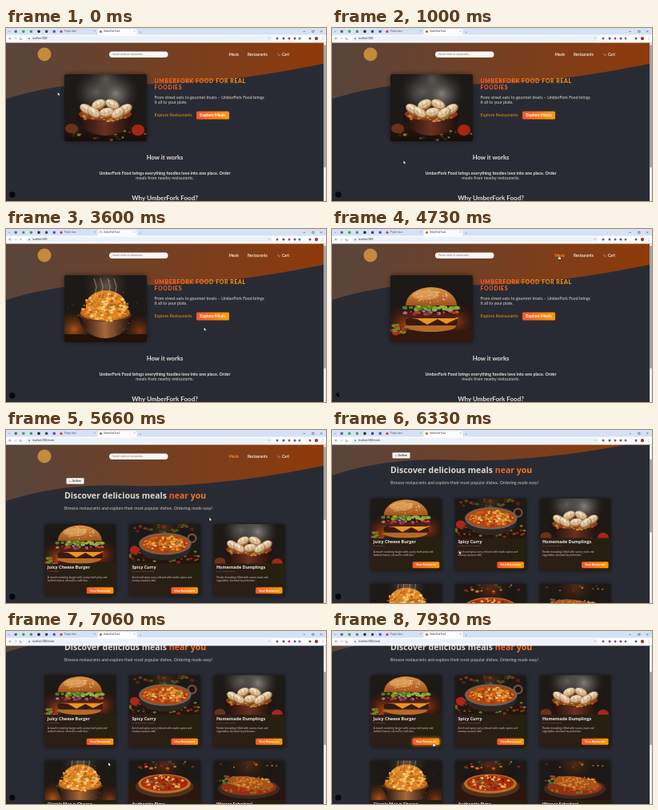
Write an HTML page with a canvas that moves like this. It is 400 px wide and 217 px high and loops after 8 s.

```html
<!DOCTYPE html>
<html lang="en">
<head>
<meta charset="utf-8">
<title>UmberFork Food</title>
<style>
html, body { margin: 0; width: 100%; height: 100%; overflow: hidden; background: #292b34; }
canvas { display: block; width: 100vw; height: 100vh; }
</style>
</head>
<body>
<canvas></canvas>
<script>
const LOOP = 8000, TOP = 18.4, BRAND = 'UmberFork Food';
const canvas = document.querySelector('canvas'), g = canvas.getContext('2d');
const SANS = 'Lato, sans-serif', HEAD = '"Open Sans", sans-serif', UI = 'Roboto, sans-serif';

// ---------- drawing helpers ----------
function text(str, x, y, size, color = '#ddd6cb', { weight = 400, font = SANS, align = 'left', gap = 0 } = {}) {
  g.font = `${weight} ${size}px ${font}`;
  g.letterSpacing = gap + 'px';
  g.textAlign = align;
  g.textBaseline = 'middle';
  g.fillStyle = color;
  g.fillText(str, x, y);
  return g.measureText(str).width;
}
function box(x, y, w, h, color, r = 0) {
  g.beginPath();
  g.roundRect(x, y, w, h, r);
  g.fillStyle = color;
  g.fill();
}
function oval(x, y, rx, ry, color, from = 0, to = Math.PI * 2, turn = 0) {
  g.beginPath();
  g.ellipse(x, y, rx, ry, turn, from, to);
  g.fillStyle = color;
  g.fill();
}
function shape(points, color) {
  g.beginPath();
  points.forEach(([x, y]) => g.lineTo(x, y));
  g.closePath();
  g.fillStyle = color;
  g.fill();
}
function line(points, color, width = 0.5) {
  g.beginPath();
  points.forEach(([x, y], i) => i ? g.lineTo(x, y) : g.moveTo(x, y));
  g.strokeStyle = color;
  g.lineWidth = width;
  g.stroke();
}
function fade(x0, y0, x1, y1, ...colors) {
  const grad = g.createLinearGradient(x0, y0, x1, y1);
  colors.forEach((c, i) => grad.addColorStop(i / (colors.length - 1), c));
  return grad;
}
function glow(x, y, r, color) {
  const grad = g.createRadialGradient(x, y, 0, x, y, r);
  grad.addColorStop(0, color);
  grad.addColorStop(1, 'rgba(0,0,0,0)');
  box(x - r, y - r, 2 * r, 2 * r, grad);
}
// Seeded scatter of small ovals inside a larger oval
function scatter(seed, n, x, y, rx, ry, size, colors) {
  const rnd = () => (seed = (seed * 16807) % 2147483647) / 2147483647;
  rnd();
  for (let i = 0; i < n; i++) {
    const a = rnd() * 6.283, d = Math.sqrt(rnd()), s = size * (0.6 + rnd() * 0.6);
    oval(x + Math.cos(a) * d * rx, y + Math.sin(a) * d * ry, s, s * 0.7, colors[i % colors.length]);
  }
}
const button = (label, x, y, w, h, size) => {
  box(x, y, w, h, fade(x, 0, x + w, 0, '#f9572a', '#ff9b05'), 1.5);
  text(label, x + w / 2, y + h / 2 + 0.2, size, '#fff', { weight: 700, align: 'center' });
};

// ---------- food pictures, drawn on a 103 x 84 field ----------
function bowl(y, rx, depth, side, rim) {
  oval(51, y, rx, depth, fade(51 - rx, 0, 51 + rx, 0, '#180e0b', side, '#1a0e0a'), 0, Math.PI);
  oval(51, y, rx, rx * 0.24, rim);
}
const foods = {
  dumplings() {
    glow(40, 22, 34, 'rgba(165,162,156,.7)');
    glow(64, 24, 34, 'rgba(190,186,178,.75)');
    glow(52, 6, 30, 'rgba(120,116,110,.6)');
    box(0, 66, 103, 18, fade(0, 62, 0, 84, '#2b1a11', '#150d0a'));
    scatter(9, 30, 51, 75, 50, 8, 2.2, ['#59301b', '#6d7a31', '#8e2417', '#33201a']);
    bowl(50, 35, 27, '#6b3020', '#2a1510');
    oval(51, 50, 33, 8, '#8c3a16');
    scatter(5, 50, 51, 53, 31, 6, 1.8, ['#c4541c', '#7f9a36', '#e28b33', '#a83a16']);
    for (const [x, y, turn] of [[28, 44, 0.5], [43, 38, -0.4], [60, 38, 0.4], [76, 44, -0.5], [37, 48, 0.6], [53, 48, -0.2], [67, 49, -0.6]]) {
      oval(x, y, 9.5, 6, '#a3774b', 0, 7, turn);
      oval(x - 0.5, y - 1, 8.5, 4.8, '#d8bd95', 0, 7, turn);
      oval(x - 1, y - 2.5, 6.5, 2, '#efe0c4', 0, 7, turn);
      line([[x - 4, y - 3], [x - 2, y + 3]], '#b98a5b', 0.7);
      line([[x + 2, y - 4], [x + 3, y + 3]], '#b98a5b', 0.7);
    }
    oval(92, 70, 8, 7, '#a62616');
    oval(9, 68, 8, 6, '#6b3219');
  },
  mac() {
    glow(52, 14, 36, 'rgba(150,128,104,.6)');
    glow(12, 68, 30, 'rgba(230,105,20,.75)');
    glow(94, 70, 28, 'rgba(205,78,15,.6)');
    box(0, 74, 103, 10, '#21110a');
    bowl(50, 33, 29, '#a8683a', '#5b341d');
    oval(51, 47, 31, 10, '#c96b15');
    oval(52, 38, 25, 19, '#dd8524');
    scatter(17, 150, 51, 40, 29, 18, 2.2, ['#eca03a', '#f2b955', '#d97c1d', '#c2601a', '#f6cd7d']);
    scatter(8, 18, 51, 36, 23, 13, 1.2, ['#68902d', '#bd3516']);
    for (const x of [38, 46, 55, 63]) line([[x, 28], [x + 2, 14], [x - 1, 4]], 'rgba(240,215,175,.4)', 1.2);
    scatter(33, 40, 51, 42, 49, 38, 0.6, ['#ff9b32', '#a8440d']);
  },
  burger() {
    glow(18, 62, 32, 'rgba(220,80,16,.65)');
    glow(84, 58, 30, 'rgba(190,60,14,.65)');
    box(0, 69, 103, 15, '#32180e');
    oval(51, 64, 31, 7, '#b66a28');
    box(19, 54, 65, 9, '#3a1a0e', 4);
    shape([[18, 53], [86, 53], [70, 61], [59, 55], [46, 62], [34, 55]], '#e8961e');
    box(20, 48, 63, 6, '#4f1f14', 3);
    scatter(19, 30, 51, 47, 33, 2.5, 2.4, ['#7c3152', '#b0688c', '#c53a1c']);
    scatter(4, 60, 51, 41, 34, 3, 2.8, ['#7d9e2d', '#567d22', '#98b23f']);
    oval(51, 38, 32, 23, fade(0, 14, 0, 40, '#dd9748', '#9d4c17'), Math.PI, Math.PI * 2);
    oval(44, 25, 17, 6, 'rgba(255,214,140,.35)');
    scatter(11, 45, 51, 26, 23, 9, 0.8, ['#f6d9a0']);
    scatter(7, 18, 10, 68, 12, 6, 3, ['#b62a16', '#6b8728']);
  },
  curry() {
    glow(51, 20, 36, 'rgba(110,62,30,.55)');
    box(0, 56, 103, 28, '#24150e');
    scatter(6, 50, 51, 60, 52, 14, 2.4, ['#8a2515', '#5b7628', '#7c431b', '#3a2216']);
    scatter(41, 24, 51, 20, 50, 6, 2.6, ['#5c2214', '#3d5a22', '#6e3b18']);
    oval(91, 34, 7, 7, '#6c5647');
    oval(91, 34, 4.5, 4.5, '#24150e');
    oval(52, 48, 37, 18, '#2d2723');
    oval(52, 42, 38, 16, '#6f6257');
    oval(52, 42, 35, 13.5, '#b2460f');
    scatter(12, 95, 52, 42, 32, 11, 2.8, ['#e4781c', '#a83510', '#f0a13b', '#d25b16']);
    scatter(21, 22, 52, 40, 28, 9, 1.8, ['#5d862c', '#ead0a0']);
    oval(8, 51, 7, 6, '#a82716');
  },
  pizza() {
    glow(51, 20, 40, 'rgba(125,54,21,.6)');
    box(0, 45, 103, 39, '#2b170f');
    oval(51, 51, 42, 16, '#54301a');
    oval(51, 47, 38, 14, '#bd7228');
    oval(51, 46, 34, 11.5, '#a82b0e');
    scatter(14, 70, 51, 46, 31, 10, 2.4, ['#e7a544', '#c93f16', '#e5bd70', '#a12610']);
    scatter(3, 22, 51, 45, 28, 9, 2, ['#50752a', '#75200f']);
    scatter(27, 18, 51, 20, 46, 7, 2.4, ['#8a2817', '#34491f', '#d06a1e']);
  },
  schnitzel() {
    glow(51, 18, 40, 'rgba(130,62,22,.5)');
    box(0, 58, 103, 26, '#25150e');
    oval(51, 54, 45, 15, '#3d2a24');
    oval(51, 52, 40, 12, '#93310f');
    scatter(24, 30, 24, 42, 16, 7, 2.6, ['#4e6d24', '#6d8b34', '#b4301a']);
    oval(54, 46, 33, 9, '#a9541a', 0, 7, 0.15);
    scatter(29, 85, 54, 45, 30, 8, 1.8, ['#d07d28', '#a54f17', '#dd963c']);
    scatter(13, 26, 52, 57, 34, 4, 2, ['#bd2d15', '#688329', '#d1581b']);
    scatter(31, 10, 51, 19, 46, 5, 1.6, ['#e38128', '#8a3a17']);
  }
};
// Cover-fit a picture into a rectangle
function picture(kind, x, y, w, h, r) {
  const s = Math.max(w / 103, h / 84);
  g.save();
  g.beginPath();
  g.roundRect(x, y, w, h, r);
  g.clip();
  box(x, y, w, h, '#1d1917');
  g.translate(x + (w - 103 * s) / 2, y + (h - 84 * s) / 2);
  g.scale(s, s);
  foods[kind]();
  g.restore();
}

// ---------- motion ----------
const clamp = v => Math.max(0, Math.min(1, v));
const ease = v => v * v * (3 - 2 * v);
const span = (t, a, b) => ease(clamp((t - a) / (b - a)));
function along(t, keys) {
  let i = 0;
  while (i < keys.length - 2 && t >= keys[i + 1][0]) i++;
  const [a, b] = [keys[i], keys[i + 1]], k = span(t, a[0], b[0]);
  return a.slice(1).map((v, j) => v + (b[j + 1] - v) * k);
}
const MOUSE = [
  [60, 64.7, 80.7], [860, 89.5, 166.5], [1800, 89.5, 166.5], [2600, 119.5, 15],
  [2800, 119.5, 15], [3530, 247.6, 123.7], [3600, 247.6, 123.7], [4330, 284, 34],
  [5200, 284, 34], [5660, 254.3, 110], [6060, 254.3, 110], [6460, 128, 165.5],
  [7000, 128, 165.5], [7800, 127.3, 140.5]
];
const SCROLL = [[6130, 0], [6525, 62.5]];

// ---------- page ----------
function header(onMeals, hover) {
  g.beginPath();
  g.moveTo(400, 0);
  g.lineTo(0, 0);
  g.lineTo(0, 89);
  g.bezierCurveTo(60, 70, 105, 68, 160, 70);
  g.bezierCurveTo(235, 72, 320, 61, 400, 44);
  g.fillStyle = fade(0, 0, 400, 0, '#59453c', '#8f3a09');
  g.fill();
  oval(48, 33, 8.5, 8.5, '#c48b3c');
  box(129, 29.5, 73.5, 7.5, '#fbf7f4', 3.7);
  text('Search meals or restaurants...', 133, 33.4, 3.1, '#77706d');
  const bold = { weight: 700 };
  text('Meals', 278.5, 33.4, 4.7, onMeals || hover ? '#ff8a1f' : '#eee5dc', bold);
  text('Restaurants', 302, 33.4, 4.7, '#eee5dc', bold);
  line([[339, 32.3], [340, 32.3], [340.8, 34.4], [342.2, 34.4], [342.6, 32.8]], '#b9c3cf', 0.5);
  text('Cart', 345, 33.6, 4.7, '#eee5dc', bold);
}
function slide(kind, show) {
  if (show <= 0) return;
  g.save();
  g.beginPath();
  g.roundRect(73, 58, 103, 84, 3);
  g.clip();
  g.globalAlpha = show;
  g.translate(124.5, 100);
  g.rotate((show - 1) * 0.087);
  g.scale(1.1 - show * 0.1, 1.1 - show * 0.1);
  picture(kind, -51.5, -42, 103, 84, 0);
  g.restore();
}
function home(t) {
  header(false, t > 4300);
  g.save();
  g.shadowColor = 'rgba(0,0,0,.5)';
  g.shadowBlur = 6;
  box(73, 58, 103, 84, '#1d1917', 3);
  g.restore();
  if (t < 3900) {
    const k = span(t, 3000, 3500);
    slide('dumplings', 1 - k);
    slide('mac', k);
  } else slide('burger', 1);

  const title = { weight: 800, gap: 0.65 }, hot = fade(186, 0, 300, 0, '#f9572a', '#ff9b05');
  text(BRAND.toUpperCase() + ' FOR REAL', 185.5, 67, 6.9, hot, title);
  text('FOODIES', 185.5, 75.2, 6.9, hot, title);
  text(`From street eats to gourmet treats – ${BRAND} brings`, 185.5, 87.2, 5.2);
  text('it all to your plate.', 185.5, 93.6, 5.2);
  text('Explore Restaurants', 185.5, 109.8, 5.4, '#f08c18');
  button('Explore Meals', 238, 104.6, 41, 10, 5.2);

  const mid = { align: 'center' }, strong = { align: 'center', weight: 700 };
  text('How it works', 198.5, 163, 7.7, '#e6e0d7', strong);
  text(`${BRAND} brings everything foodies love into one place. Order`, 198.5, 182, 5.35, '#e9e4dc', strong);
  text('meals from nearby restaurants.', 198.5, 188.2, 5.35, '#ddd6cb', mid);
  text(`Why ${BRAND}?`, 198.5, 214, 8, '#e6e0d7', strong);
}
const MEALS = [
  ['burger', 'Juicy Cheese Burger', 'by Tom Ember', 'A mouth-watering burger with a juicy beef patty and', 'melted cheese, served in a soft bun.'],
  ['curry', 'Spicy Curry', 'by Saffron Corner Company', 'A rich and spicy curry, infused with exotic spices and', 'creamy coconut milk.'],
  ['dumplings', 'Homemade Dumplings', 'by Ah Lo Steam Kitchen', 'Tender dumplings filled with savory meat and', 'vegetables, steamed to perfection.'],
  ['mac', 'Classic Mac n Cheese'],
  ['pizza', 'Authentic Pizza'],
  ['schnitzel', 'Wiener Schnitzel']
];
function card([kind, title, by, first, second], i, hover) {
  const x = 48.3 + (i % 3) * 105.6, y = 118 + Math.floor(i / 3) * 107;
  g.save();
  g.shadowColor = 'rgba(0,0,0,.55)';
  g.shadowBlur = 5;
  box(x, y, 89, 90.5, fade(x, 0, x + 89, 0, '#2c1e19', '#25200f'), 1.5);
  g.restore();
  picture(kind, x, y, 89, 49.5, [1.5, 1.5, 0, 0]);
  text(title, x + 3.5, y + 55, 5.4, '#eee7df', { weight: 700, font: HEAD });
  if (!by) return;
  text(by, x + 3.5, y + 59.7, 2.3, '#a4774e');
  text(first, x + 3.5, y + 66.7, 3.25, '#cbc3ba');
  text(second, x + 3.5, y + 70.7, 3.25, '#cbc3ba');
  g.save();
  if (hover) {
    g.shadowColor = '#f98a1c';
    g.shadowBlur = 4;
  }
  button('View Restaurant', x + 52.5, y + 79.3, 33.5, 8, 3.5);
  g.restore();
}
function meals(t) {
  header(true);
  box(75.5, 60.3, 22, 7.4, '#f6f4f1', 1);
  text('← Go Back', 86.5, 64.1, 3, '#34302e', { align: 'center', weight: 700 });
  const big = { weight: 700, font: HEAD };
  const w = text('Discover delicious meals ', 73, 83.4, 10.5, '#ddd6cb', big);
  text('near you', 73 + w, 83.4, 10.5, fade(205, 0, 251, 0, '#f9572a', '#f5801a'), big);
  text('Browse restaurants and explore their most popular dishes. Ordering made easy!', 73, 98.8, 5.33, '#c9c3ba');
  MEALS.forEach((m, i) => card(m, i, i === 0 && t > 7650));
}

// ---------- browser frame ----------
function ring(x, y, r, t, color) {
  g.beginPath();
  g.arc(x, y, r, t / 130, t / 130 + 4.4);
  g.strokeStyle = color;
  g.lineWidth = 0.6;
  g.stroke();
}
function chrome(t, onMeals) {
  const focus = t > 2600 && t < 3050, loading = t > 3050 && t < 3900;
  box(0, 0, 400, 9, '#d5e2f6');
  box(0, 8.6, 400, TOP - 8.6, '#fbfcfe');
  line([[3, 3.8], [4, 4.8], [5, 3.8]], '#424954');
  ['#61666c', '#39a852', '#4b9659', '#20242c', '#3f4650', '#5a4bd0']
    .forEach((c, i) => box(10.6 + i * 9.6, 2.7, 3.2, 3.2, c, 0.8));
  oval(69, 4.4, 1.6, 1.6, '#cf3f45');
  text('Project docs', 73, 4.5, 2.7, '#49515d', { font: UI });
  text('×', 111, 4.4, 3.5, '#59616c', { align: 'center' });
  box(114.5, 1.2, 49, 8, '#fbfcfe', [2, 2, 0, 0]);
  if (loading) ring(118.5, 4.4, 1.5, t, '#59616c');
  else oval(118.5, 4.4, 1.7, 1.7, '#c27b2f');
  text(BRAND, 122, 4.5, 2.7, '#30353c', { font: UI });
  text('×', 160.5, 4.4, 3.5, '#59616c', { align: 'center' });
  text('+', 168, 4.4, 4, '#424954', { align: 'center' });
  line([[371.5, 4.4], [374, 4.4]], '#353b43');
  g.strokeRect(382.8, 3.2, 2.2, 2.2);
  line([[393, 3.2], [395.3, 5.5]], '#353b43');
  line([[395.3, 3.2], [393, 5.5]], '#353b43');

  line([[5.3, 11.5], [3.7, 13.1], [5.3, 14.7]], '#515963');
  line([[3.7, 13.1], [7, 13.1]], '#515963');
  line([[11.7, 11.5], [13.3, 13.1], [11.7, 14.7]], '#a4aab2');
  line([[10, 13.1], [13.3, 13.1]], '#a4aab2');
  if (loading) text('×', 18.5, 13, 4.5, '#515963', { align: 'center' });
  else ring(18.5, 13.1, 1.4, 0, '#515963');
  box(25, 10.1, 308, 6.2, focus ? '#fff' : '#edf1f9', 3.1);
  if (focus) {
    g.strokeStyle = '#1f63d2';
    g.lineWidth = 0.6;
    g.stroke();
    box(302, 10.9, 23, 4.6, '#dbe5f8', 2.3);
    oval(304.8, 13.2, 1, 1, '#4c7bd5');
    text('Visual Lens', 307, 13.3, 2.9, '#333c4d', { font: UI });
  }
  oval(29, 13.2, 1, 1, '#79818c');
  const url = 'localhost:3000' + (onMeals ? '/meals' : '');
  const w = text(url, 33, 13.3, 2.8, '#30363e', { font: UI });
  if (focus) box(33.5 + w, 11.5, 0.4, 3.5, '#30363e');
  text('☆', 329, 13.1, 3.7, '#515963', { align: 'center', font: '"DejaVu Sans", sans-serif' });
  [[339, '#8b5161'], [347, '#5a41ba'], [354, '#b04454'], [361, '#594fb3'], [367, '#6b737c'], [380, '#555d67']]
    .forEach(([x, c]) => box(x - 1.3, 11.8, 2.6, 2.6, c, 0.7));
  oval(388, 13.1, 2.2, 2.2, '#a83434');
  for (const y of [11.7, 13.1, 14.5]) oval(396, y, 0.4, 0.4, '#515963');
}
function pointer([x, y], t) {
  if (t > 2450 && t < 2900) {
    line([[x, y - 2.2], [x, y + 2]], '#222', 0.6);
    return;
  }
  g.save();
  g.translate(x, y);
  g.beginPath();
  if ((t > 4250 && t < 5260) || t > 7650) {
    g.roundRect(-0.5, 0, 1, 2.8, 0.5);
    g.roundRect(-1.2, 1.7, 3.2, 2.4, 0.8);
  } else {
    [[0, 0], [0, 3.8], [0.9, 3], [1.5, 4.3], [2.1, 4], [1.5, 2.8], [2.7, 2.7]].forEach(p => g.lineTo(...p));
    g.closePath();
  }
  g.strokeStyle = '#111';
  g.lineWidth = 0.7;
  g.stroke();
  g.fillStyle = '#fff';
  g.fill();
  g.restore();
}

function draw(now) {
  const t = now % LOOP, dpr = devicePixelRatio || 1;
  const W = Math.round(innerWidth * dpr), H = Math.round(innerHeight * dpr);
  if (canvas.width !== W || canvas.height !== H) {
    canvas.width = W;
    canvas.height = H;
  }
  g.setTransform(W / 400, 0, 0, H / 217, 0, 0);
  const onMeals = t >= 5260, [scroll] = along(t, SCROLL);
  box(0, 0, 400, 217, '#292b34');
  g.save();
  g.translate(0, -scroll);
  if (onMeals) meals(t);
  else home(t);
  g.restore();

  box(397, TOP, 3, 217 - TOP, '#e9e9ea');
  box(397.5, 21 + scroll * 0.48, 2, onMeals ? 92 : 154, '#85878b', 1);
  oval(7.8, 209, 3.7, 3.7, '#08090b');
  if (t > 4460 && t < 5260) ring(7.8, 209, 3, t, '#777b83');
  chrome(t, onMeals);
  pointer(along(t, MOUSE), t);
  requestAnimationFrame(draw);
}
requestAnimationFrame(draw);
</script>
</body>
</html>
```
